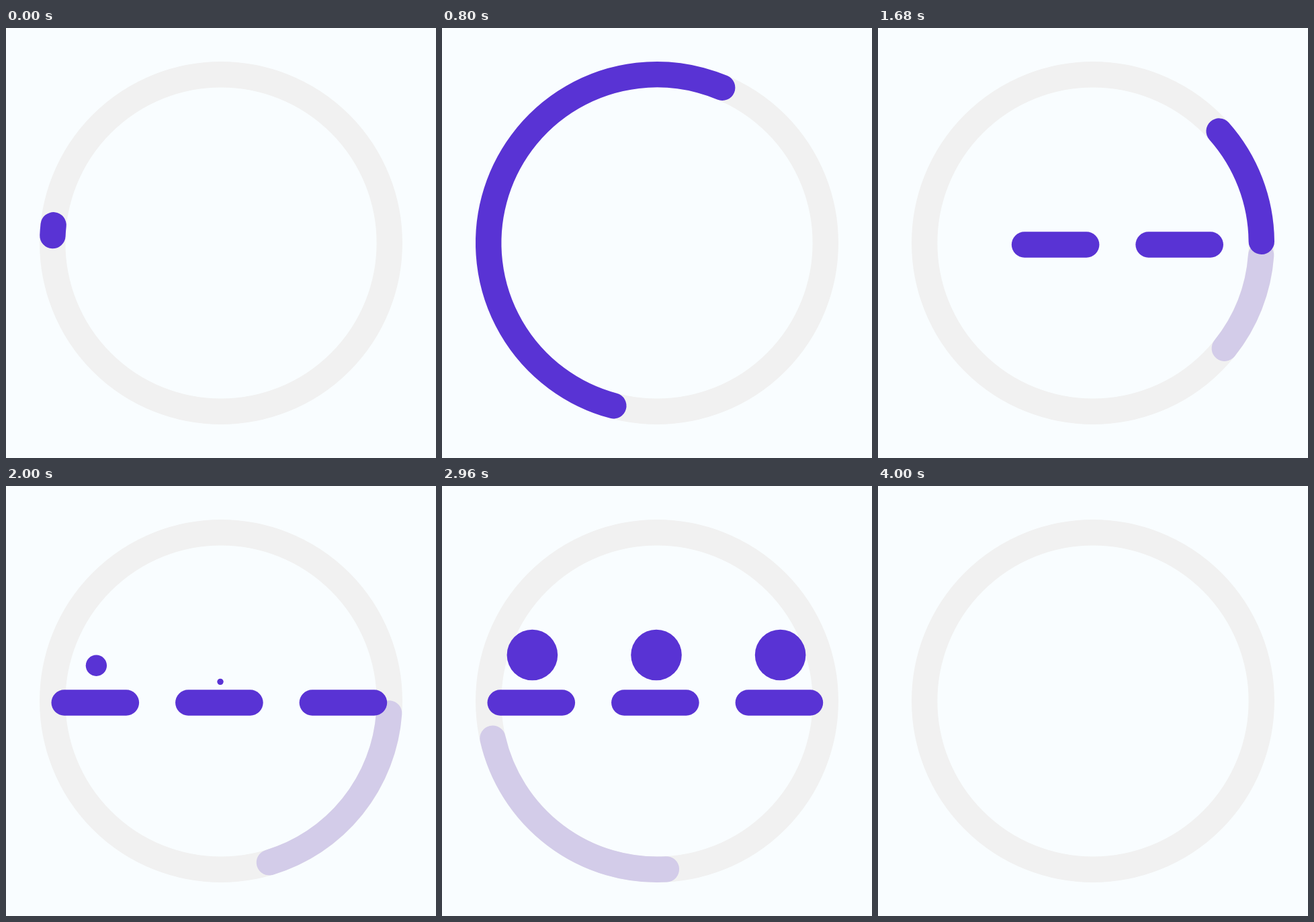
An HTML page with a canvas that plays this animation: 640x640 px, repeating every 4.08 s.

```html
<!DOCTYPE html>
<html lang="en">
<head>
<meta charset="utf-8">
<title>Loader</title>
<style>
  html, body { margin: 0; width: 100%; height: 100%; overflow: hidden; background: #f9fdff; }
  canvas { display: block; width: 640px; height: 640px; }
</style>
</head>
<body>
<canvas id="stage" width="640" height="640"></canvas>
<script>
const ctx = document.getElementById('stage').getContext('2d');
const LOOP = 4080, STEP = 40, LAST = 4000;
const BG = '#f9fdff', TRACK = '#f1f1f1', MAIN = '#5933d4', PALE = '#d3cce9';
const C = 320, R = 250.8, WIDTH = 38.4;

// Line the bars travel along, and their resting places
const LINE = { left: 71.7, right: 568, y: 322.5 };
const BAR = { first: 86.7, length: 92.2, pitch: 184.55, travel: 500 };
const DOT = { first: 134.4, pitch: 184.6, r: 37.8, low: 303, peak: 245, rest: 251.5 };

// Smooth 0..1 ramp between two times
function ease(t, from, to) {
  const u = Math.min(1, Math.max(0, (t - from) / (to - from)));
  return u * u * (3 - 2 * u);
}

// Angles in degrees, clockwise from the right
const mainHead = t => 180 + 539.5 * ease(t, -70, 1045);
const mainTail = t => 180 + 370 * ease(t, -60, 1188) + 170 * ease(t, 1110, 1951);
const paleHead = t => 175.2 * ease(t, 994, 3252) + 4.8 * ease(t, 3300, 3960);
const paleTail = t => 4.2 + 175.8 * ease(t, 2000, 4000);

function arc(from, to, color) {
  if (to - from < 0.01) return;
  ctx.strokeStyle = color;
  ctx.beginPath();
  ctx.arc(C, C, R, from * Math.PI / 180, to * Math.PI / 180);
  ctx.stroke();
}

function drawBars(t) {
  const shift = BAR.travel * (1 - ease(t, 1067, 1990) - ease(t, 3187, 4110));
  ctx.strokeStyle = MAIN;
  for (let i = 0; i < 3; i++) {
    const x = BAR.first + i * BAR.pitch + shift;
    const a = Math.max(LINE.left, x);
    const b = Math.min(LINE.right, x + BAR.length);
    if (b <= a) continue;
    ctx.beginPath();
    ctx.moveTo(a, LINE.y);
    ctx.lineTo(b, LINE.y);
    ctx.stroke();
  }
}

// Dots pop up from left to right, overshoot, then drop from right to left
function drawDots(t) {
  ctx.fillStyle = MAIN;
  for (let i = 0; i < 3; i++) {
    const up = 1823 + i * 89;
    const down = 3371 - i * 112;
    const r = DOT.r * (ease(t, up, up + 400) - ease(t, down, down + 400));
    if (r <= 0.05) continue;
    const y = DOT.low
      + (DOT.peak - DOT.low) * ease(t, up, up + 306)
      + (DOT.rest - DOT.peak) * ease(t, up + 306, up + 560)
      + (DOT.low - DOT.rest) * ease(t, down + 145, down + 405);
    ctx.beginPath();
    ctx.arc(DOT.first + i * DOT.pitch, y, r, 0, Math.PI * 2);
    ctx.fill();
  }
}

function draw(t) {
  ctx.fillStyle = BG;
  ctx.fillRect(0, 0, 640, 640);
  ctx.lineWidth = WIDTH;
  ctx.lineCap = 'round';
  arc(0, 360, TRACK);
  arc(paleTail(t), paleHead(t), PALE);
  arc(mainTail(t), mainHead(t), MAIN);
  drawBars(t);
  drawDots(t);
}

const start = performance.now();
function tick() {
  const t = (performance.now() - start) % LOOP;
  draw(Math.min(LAST, Math.floor(t / STEP) * STEP));
  requestAnimationFrame(tick);
}
tick();
</script>
</body>
</html>
```
